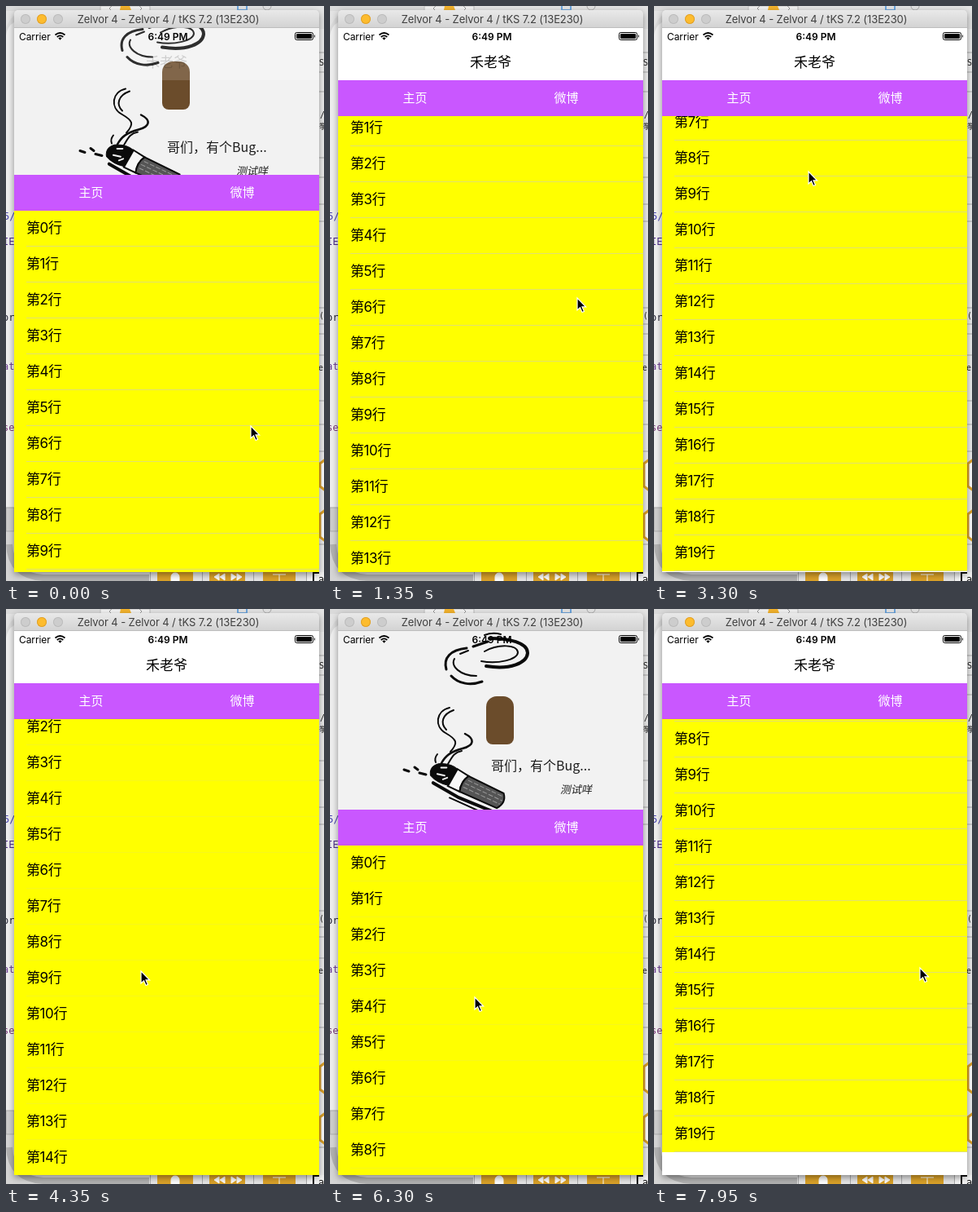
An HTML page that plays this animation: 391 px wide and 705 px high, repeating every 8 s.

```html
<!DOCTYPE html>
<html lang="zh-CN">
<head>
<meta charset="utf-8">
<title>Scrolling header</title>
<style>
html, body { margin: 0; width: 100%; height: 100%; overflow: hidden; background: #d6d6d6; }
body { font-family: Inter, "Noto Sans CJK SC", "Noto Sans CJK", sans-serif; }
#stage { position: relative; width: 391px; height: 705px; overflow: hidden; }
#stage > *, #screen > *, .row, .tabs span { position: absolute; }
svg { display: block; overflow: hidden; }
#frame { left: 10px; top: 5px; width: 375px; height: 689px; border-radius: 5px 5px 0 0; box-shadow: 0 3px 9px rgba(0,0,0,.42); }
#bar { left: 10px; top: 5px; width: 375px; height: 22px; border-radius: 5px 5px 0 0; background: linear-gradient(#e9e9e9, #d2d2d2); box-shadow: inset 0 -1px #bdbdbd; }
#bar span { position: absolute; left: 2px; width: 375px; text-align: center; font-size: 13px; line-height: 22px; letter-spacing: -.1px; color: #3f3f3f; white-space: pre; }
#bar i { position: absolute; top: 5px; width: 12px; height: 12px; border-radius: 50%; background: #cdcdcd; box-shadow: inset 0 0 0 1px #bcbcbc; }
#bar i.on { background: #fdbc2e; box-shadow: inset 0 0 0 1px #e0a02a; }
#screen { left: 10px; top: 27px; width: 375px; height: 667px; overflow: hidden; background: #fff; }
#head { left: 0; top: 0; width: 375px; overflow: hidden; background: #f2f2f2; }
#art, #mascot { position: absolute; left: 0; top: 0; }
#mascot { left: 182px; width: 34px; height: 59px; border-radius: 13px 13px 8px 8px; background: #6b4c2b; }
#nav { left: 0; top: 0; width: 375px; height: 64px; background: #fff; }
#nav span { position: absolute; left: 0; top: 30px; width: 375px; text-align: center; font-size: 17px; line-height: 24px; color: #000; }
.tabs { left: 0; top: 0; width: 375px; height: 44px; background: #c957ff; color: #fff; font-size: 15px; line-height: 44px; }
.tabs span { width: 187px; text-align: center; top: 0; }
#clip { left: 0; width: 375px; height: 667px; overflow: hidden; }
#list { position: absolute; left: 0; top: 0; width: 375px; height: 880px; background: #ff0; }
.row { left: 15px; right: 0; height: 44px; font-size: 17px; line-height: 43px; letter-spacing: -.4px; color: #000; }
.row::after { content: ""; position: absolute; left: 0; right: 0; bottom: 0; height: 1px; background: #c8c7cc; opacity: var(--rule, .55); }
#status { left: 0; top: 0; }
</style>
</head>
<body>
<div id="stage">
  <!-- desktop behind the window -->
  <svg width="391" height="705" font-family="DejaVu Sans Mono, monospace" font-size="12">
    <rect width="391" height="705" fill="#e4e4e4"/>
    <path d="M0 0H115V6H0z" fill="#dadada"/>
    <path d="M116 0H177V6H116z" fill="#f4f4f4" stroke="#bbb"/>
    <path d="M130 0l-3 3 3 3M164 0l3 3-3 3" fill="none" stroke="#999"/>
    <path d="M141 0h11l2 5h-14z" fill="#f4b32c"/>
    <path d="M285 0v5h11V0" fill="none" stroke="#6ea6de" stroke-width="2"/>
    <circle cx="321" cy="0" r="5" fill="none" stroke="#aaa"/>
    <path d="M0 26Q6 14 10 12V694H0z" fill="#dcdcdc"/>
    <path d="M0 36Q2 24 10 20V615H0z" fill="#efefef"/>
    <path d="M0 615H10V644H0z" fill="#cfcfcf" stroke="#aaa"/>
    <path d="M0 645H10V690Q30 703 60 705H0z" fill="#d5d5d5"/>
    <path d="M4 660Q6 699 46 701H176" fill="none" stroke="#b2b2b2" stroke-width="8"/>
    <g fill="#223">
      <text x="-3" y="262" fill="#4541b0">5/</text><text x="-4" y="293" fill="#4b2a88">IE</text>
      <text x="-4" y="386">or</text><text x="-4" y="446" fill="#6a3c93">at</text><text x="-4" y="521" fill="#7a3a7a">se</text>
    </g>
    <path d="M385 28H391V705H385z" fill="#ededed"/>
    <path d="M385 57h6M385 81h6M385 105h6M385 186h6M385 210h6M385 243h6M385 264h6M385 370h6M385 390h6M385 402h6M385 428h6M385 484h6M385 513h6M385 546h6M385 660h6" stroke="#aaa"/>
    <g font-size="10" fill="#222"><text x="385" y="73">Sc</text><text x="386" y="137">/:</text><text x="385" y="151">挙</text><text x="385" y="383">(L</text><text x="384" y="447">er</text></g>
    <path d="M394 555l-8 6v28l8 6M394 617l-8 6v28l8 6" fill="#fff" stroke="#dca128" stroke-width="3"/>
    <path d="M177 694H370V705H177z" fill="#e6e6e6"/>
    <path d="M177.500 694v11M241.500 694v11M304.500 694v11M369.500 694v11" stroke="#aaa"/>
    <path d="M186 694h44v12h-44zM250 694h44v12h-44zM316 694h40v12h-40z" fill="#dba229"/>
    <path d="M203 705v-5a5 5 0 0 1 10 0v5M262 696l-6 4 6 4zM269 696l-6 4 6 4zM277 696l6 4-6 4zM284 696l6 4-6 4zM336 697v8M328 697h16" fill="#fff" stroke="#fff"/>
    <path d="M370 694H391V705H370z" fill="#f4f4f4"/>
    <path d="M378 705v-10h7" fill="none" stroke="#111" stroke-width="2"/><text x="384" y="707" fill="#111">a</text>
  </svg>
  <div id="frame"></div>
  <div id="bar">
    <i style="left:8px"></i><i class="on" style="left:28px"></i><i style="left:48px"></i>
    <span>Zelvor 4 - Zelvor 4 / tKS 7.2 (13E230)</span>
  </div>

  <div id="screen">
    <div id="head">
      <svg id="art" width="375" height="320" viewBox="10 -23 375 320" fill="none" stroke="#0b0b0b" stroke-linecap="round">
        <!-- smoke -->
        <g stroke-width="3">
          <path d="M168 48C148 50 139 60 143 74M149 82C158 92 173 94 187 89M176 46l18-6"/>
          <path d="M196 36C220 36 243 41 243 54C242 66 222 75 192 70" stroke-width="4"/>
          <path d="M186 64C206 68 231 62 231 53C230 44 208 42 190 52" stroke-width="2"/>
          <path d="M153 61C148 70 160 82 180 82M190 32q10-4 20-1M160 55l10-4" stroke-width="2"/>
        </g>
        <g stroke-width="2">
          <path d="M147 121C130 125 128 144 142 152S158 164 148 175"/>
          <path d="M152 124C138 129 135 140 143 148"/>
          <path d="M166 153C178 159 178 167 163 171S142 180 137 189" stroke-width="2.500"/>
          <path d="M162 174C152 176 150 182 145 190M132 178q-4 5 -2 10"/>
        </g>
        <path d="M91 197l6 2M104 194l4 3M110 201l8 2" stroke-width="3"/>
        <!-- cigarette -->
        <g transform="translate(130 197) rotate(25)">
          <path d="M0-8Q12-15 24-12L22 11Q8 14-3 9Q-9 0 0-8z" fill="#0b0b0b"/>
          <path d="M5-5l6-3M4 4l9-2M13 7l4-4" stroke="#f2f2f2" stroke-width="2"/>
          <path d="M24-12L40-10Q34 0 38 12L22 12z" fill="#f7f7f7" stroke-width="2"/>
          <path d="M40-10L88-9Q96 0 88 11L38 12Q34 0 40-10z" fill="#555" stroke-width="2"/>
          <path d="M42-5H88M40 0H90M40 5H89" stroke="#999" stroke-dasharray="5 3"/>
          <path d="M4 16L40 19L104 16" stroke-width="4"/>
          <path d="M30 24L96 23" stroke-width="2"/>
        </g>
        <g fill="#1d1d1d" stroke="none" font-family="Noto Sans CJK SC, Noto Sans CJK, sans-serif" font-weight="300">
          <text x="198" y="198" font-size="16">哥们，有个Bug...</text>
          <text transform="translate(283 226) skewX(-12)" font-size="13">测试咩</text>
        </g>
      </svg>
      <div id="mascot"></div>
    </div>
    <div id="clip"><div id="list"></div></div>
    <div id="nav"><span>禾老爷</span></div>
    <div class="tabs" id="tabs"><span style="left:1px">主页</span><span style="left:187px">微博</span></div>
    <svg id="status" width="375" height="20" font-size="12">
      <text x="6" y="14.500" letter-spacing="-.1">Carrier</text>
      <text x="189" y="14.500" font-weight="600" text-anchor="middle">6:49 PM</text>
      <g fill="none" stroke="#000" stroke-width="1.700"><path d="M50.500 8.500q6-5 12 0M52.700 11q3.800-3.200 7.600 0"/></g>
      <path d="M54.300 12.300q2.200-1.600 4.400 0l-2.200 2.400z"/>
      <rect x="345.500" y="5.500" width="22" height="9" rx="2" fill="none" stroke="#000"/>
      <rect x="347" y="7" width="19" height="6" rx="1"/><path d="M369 8q2 2 0 4z"/>
    </svg>
  </div>

  <svg id="cursor" style="left:0;top:0" width="16" height="22" viewBox="-2 -2 16 22">
    <path d="M0 0V15L3.500 11.800L6 17.500L8.500 16.400L6 10.900H10.600z" stroke="#fff" stroke-width="1.200"/>
  </svg>
</div>

<script>
const LOOP = 8000, STEP = 150, REST = 200, PINNED = 64, TAB = 44;
const $ = id => document.getElementById(id);
const [head, art, mascot, clip, list, nav, tabs, cursor] =
  ["head", "art", "mascot", "clip", "list", "nav", "tabs", "cursor"].map($);

for (let i = 0; i < 20; i++) {
  const row = document.createElement("div");
  row.className = "row";
  row.style.top = i * 44 + "px";
  row.textContent = `第${i}行`;
  list.append(row);
}

// time, scroll offset, pointer x, pointer y
const keys = [
  [0, 20, 301, 515], [600, 110, 308, 420], [900, 172, 316, 364], [1050, 187, 316, 358],
  [1200, 187, 316, 358], [1350, 187, 304, 358], [1650, 187, 184, 284], [1800, 187, 184, 284],
  [2400, 406, 190, 65], [2550, 406, 190, 65], [2850, 410, 194, 310], [3150, 480, 191, 225],
  [3300, 458, 190, 203], [3600, 457, 186, 212], [4350, 235.5, 166, 444], [4650, 200, 166, 455],
  [4950, 200, 190, 140], [5400, 80, 191, 254], [5700, 4, 190, 330], [5850, 0, 190, 330],
  [6000, 0, 190, 330], [6150, 0, 184, 420], [6300, -19.5, 178, 476], [6450, -45, 176, 530],
  [6600, -45, 176, 530], [6900, 0, 178, 500], [7050, 15, 200, 480], [7350, 187, 300, 330],
  [7500, 187, 300, 330], [7650, 300, 320, 560], [7800, 440, 326, 470], [7950, 485, 327, 440]
];

function poseAt(t) {
  const n = keys.findIndex(k => k[0] >= t);
  if (n <= 0) return keys[0].slice(1);
  const a = keys[n - 1], b = keys[n], p = (t - a[0]) / (b[0] - a[0]);
  return [1, 2, 3].map(i => a[i] + (b[i] - a[i]) * p);
}

const move = (el, x, y) => el.style.transform = `translate(${x}px, ${y}px)`;

function draw(now) {
  const [raw, x, y] = poseAt(Math.floor(now % LOOP / STEP) * STEP);
  const half = Math.round(raw * 2) / 2, scroll = Math.ceil(half);
  const top = Math.max(PINNED, REST - scroll);
  const alpha = Math.min(1, Math.max(0, scroll / (REST - PINNED)));
  head.style.height = top + "px";
  // the picture stays centred in the header, the mascot rides its lower edge
  move(art, 0, top / 2 - 159.5);
  move(mascot, 0, top - 139);
  move(tabs, 0, top);
  clip.style.top = top + TAB + "px";
  move(list, 0, REST - scroll - top);
  list.style.setProperty("--rule", half % 1 ? .14 : .55);
  nav.style.backgroundColor = `rgba(255,255,255,${alpha})`;
  nav.firstElementChild.style.opacity = alpha;
  move(cursor, Math.round(x) - 2, Math.round(y) - 2);
}

const start = performance.now();
function tick() {
  draw(performance.now() - start);
  requestAnimationFrame(tick);
}
tick();
</script>
</body>
</html>
```
